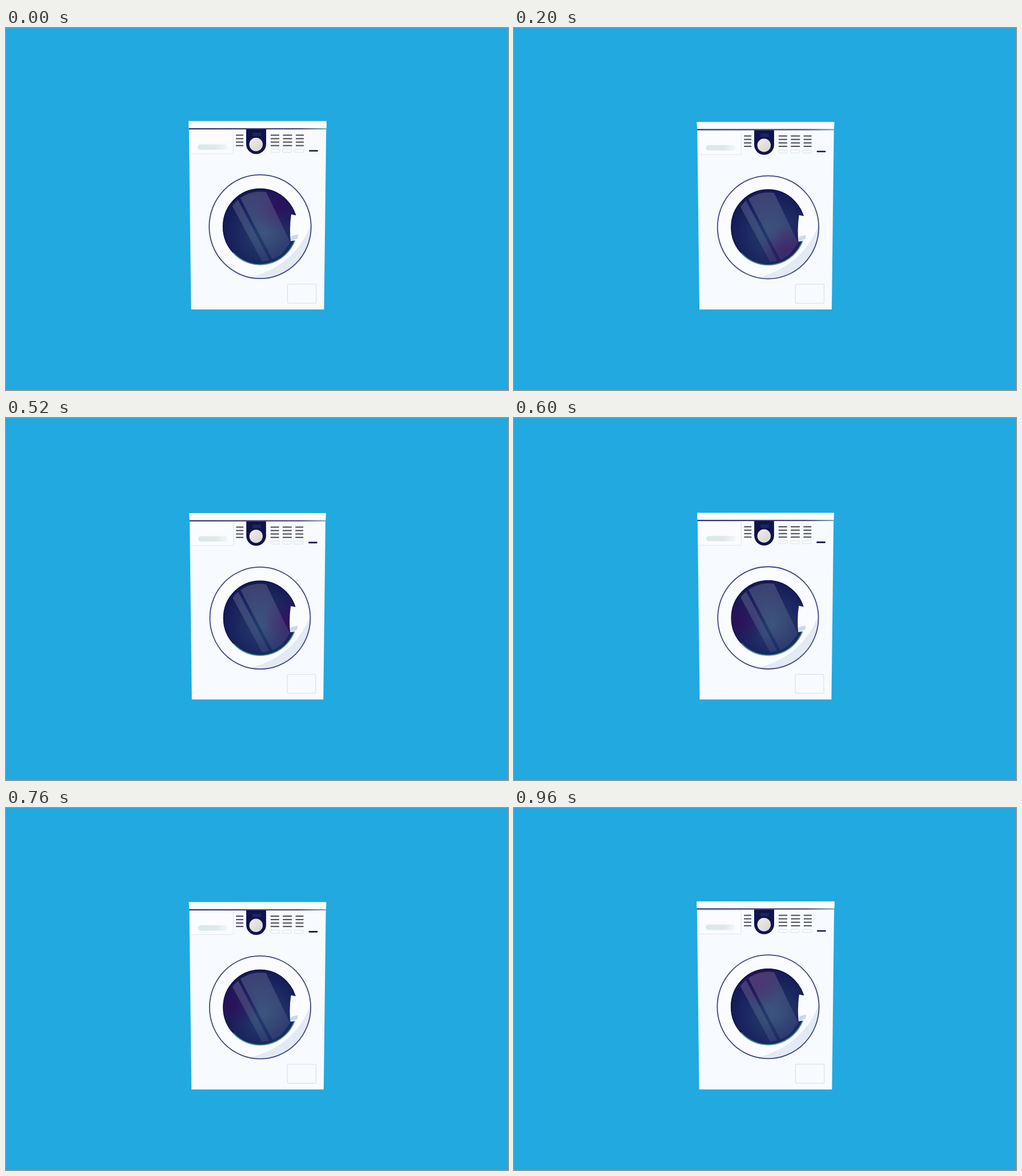
Recreate the animation shown at these times as an HTML page. Size 880 px wide and 636 px high, loop 1 s.

```html
<!DOCTYPE html>
<html lang="en">
<head>
<meta charset="utf-8">
<title>Washing machine</title>
<style>
html, body { margin: 0; width: 100%; height: 100%; overflow: hidden; background: #22a9df; }
svg { display: block; width: 100%; height: 100%; }
</style>
</head>
<body>
<svg viewBox="0 0 880 636" xmlns="http://www.w3.org/2000/svg">
  <defs>
    <linearGradient id="seam">
      <stop offset="0" stop-color="#292e6c"/>
      <stop offset=".8" stop-color="#44467c"/>
      <stop offset="1" stop-color="#77b3ab"/>
    </linearGradient>
    <linearGradient id="grip">
      <stop offset="0" stop-color="#d9e8ec"/>
      <stop offset=".6" stop-color="#dee8ed"/>
      <stop offset="1" stop-color="#f2f6f9"/>
    </linearGradient>
    <linearGradient id="dial" x2="1" y2="1">
      <stop offset="0" stop-color="#f0efec"/>
      <stop offset="1" stop-color="#d4d2d0"/>
    </linearGradient>
    <radialGradient id="glass" cx=".56" cy=".6" r=".68">
      <stop offset="0" stop-color="#24406f"/>
      <stop offset=".5" stop-color="#1c2a62"/>
      <stop offset="1" stop-color="#131350"/>
    </radialGradient>
    <radialGradient id="glow">
      <stop offset="0" stop-color="#35095a" stop-opacity=".7"/>
      <stop offset="1" stop-color="#35095a" stop-opacity="0"/>
    </radialGradient>
    <linearGradient id="shine" gradientUnits="userSpaceOnUse" x1="425" y1="290" x2="470" y2="412">
      <stop offset="0" stop-color="#fff" stop-opacity=".17"/>
      <stop offset="1" stop-color="#fff" stop-opacity=".07"/>
    </linearGradient>
    <clipPath id="pane"><ellipse cx="445.5" cy="349" rx="65.5" ry="67"/></clipPath>
    <clipPath id="inner"><ellipse cx="445.5" cy="349" rx="60.5" ry="61.5"/></clipPath>
  </defs>
  <rect width="880" height="636" fill="#22a9df"/>

  <g id="cabinet">
    <path d="M320 163.7H562L561.3 178L557.5 494.4H324.5L320.7 178Z" fill="#f7faff"/>
    <path d="M320 163.7H562L561.5 176H320.5Z" fill="#fafcff"/>
    <rect x="320.5" y="176" width="241" height="2.2" fill="url(#seam)"/>
    <path d="M322 180H398V221H322.5" fill="#fafcff" stroke="#e0e6ed"/>
    <rect x="336" y="204.5" width="52" height="9.5" rx="4.5" fill="url(#grip)"/>
    <g id="vents" stroke="#484553" stroke-width="2"/>
    <g id="buttons" fill="#fbfcff" stroke="#d9dfe5"/>
    <path d="M532.3 215.8H545.7" stroke="#111648" stroke-width="2.6" stroke-linecap="round"/>
    <path d="M421 178H456V204A17.5 17.5 0 0 1 421 204Z" fill="#10134a"/>
    <path d="M432 184H447V190H432Z" fill="#1d2560"/>
    <circle cx="438.3" cy="204.6" r="11.8" fill="url(#dial)"/>
    <rect x="493.5" y="450" width="50.5" height="33.5" rx="2.5" fill="none" stroke="#dbe1e7" stroke-width="1.2"/>
  </g>

  <g id="door">
    <ellipse cx="445.5" cy="349" rx="89" ry="91" fill="#fafcff"/>
    <path d="M534.5 345A89 91 0 0 1 428 438Q506 418 534.5 345Z" fill="#e3eaf3"/>
    <ellipse cx="445.5" cy="349" rx="89.3" ry="91.2" fill="none" stroke="#3d4580" stroke-width="1.8"/>
    <g clip-path="url(#pane)">
      <ellipse cx="445.5" cy="349" rx="65.5" ry="67" fill="url(#glass)"/>
      <circle id="tint" r="46" fill="url(#glow)"/>
      <g clip-path="url(#inner)" fill="url(#shine)">
        <path d="M391 302L402.5 294L464.5 414H451Z"/>
        <path d="M405 288L454 284L498.5 377L471 414Z"/>
      </g>
    </g>
    <ellipse cx="445.5" cy="349" rx="65" ry="66.5" fill="none" stroke="#111345" stroke-width="1.4"/>
    <path d="M398 394.5A65 66.5 0 0 0 506.5 372.5" fill="none" stroke="#4a9691" stroke-width="1.8"/>
    <path d="M500 327.5L513 330V372L499 374.5Q496.5 351 500 327.5Z" fill="#fafcff"/>
    <path d="M500 365.5L512.5 362.5L511 370L499 374Z" fill="#ccd8e8"/>
  </g>
</svg>
<script>
const LOOP = 1000, STEP = 40, HALF = LOOP / 2;
const byId = id => document.getElementById(id);

function add(parent, tag, attrs) {
  const el = document.createElementNS("http://www.w3.org/2000/svg", tag);
  for (const key in attrs) el.setAttribute(key, attrs[key]);
  parent.appendChild(el);
}

for (const [x, w] of [[403, 13], [464, 15], [485.5, 16], [508, 14]])
  for (let row = 0; row < 4; row++)
    add(byId("vents"), "path", { d: `M${x} ${188.3 + row * 6.1}h${w}` });
for (const x of [464, 485, 506])
  add(byId("buttons"), "rect", { x, y: 213.1, width: 15.5, height: 5.2, rx: 1 });

// Time and direction in degrees of the purple tint in the glass.
const TINT = [[0, -45], [200, 50], [360, 35], [560, 0], [560, 172], [760, 185], [960, 250], [1000, 315]];

function tintAngle(t) {
  let i = 0;
  while (i < TINT.length - 2 && t > TINT[i + 1][0]) i++;
  const [t0, a0] = TINT[i], [t1, a1] = TINT[i + 1];
  return a0 + (a1 - a0) * (t - t0) / (t1 - t0);
}

function squash(id, baseY, k, dx, dy) {
  byId(id).setAttribute("transform",
    `translate(441 ${baseY}) scale(${1 - k * dx} ${1 - k * dy}) translate(-441 ${-baseY})`);
}

function draw(time) {
  const t = Math.floor(time % LOOP / STEP) * STEP;
  const k = 1 - Math.abs(t - HALF) / HALF;
  squash("cabinet", 494, k, 0.011, 0.0115);
  squash("door", 495, k, 0.0145, 0.0182);
  const a = tintAngle(t) * Math.PI / 180;
  byId("tint").setAttribute("cx", 445.5 + 48 * Math.cos(a));
  byId("tint").setAttribute("cy", 349 + 48 * Math.sin(a));
}

const start = performance.now();
function tick() {
  draw(performance.now() - start);
  requestAnimationFrame(tick);
}
tick();
</script>
</body>
</html>
```
